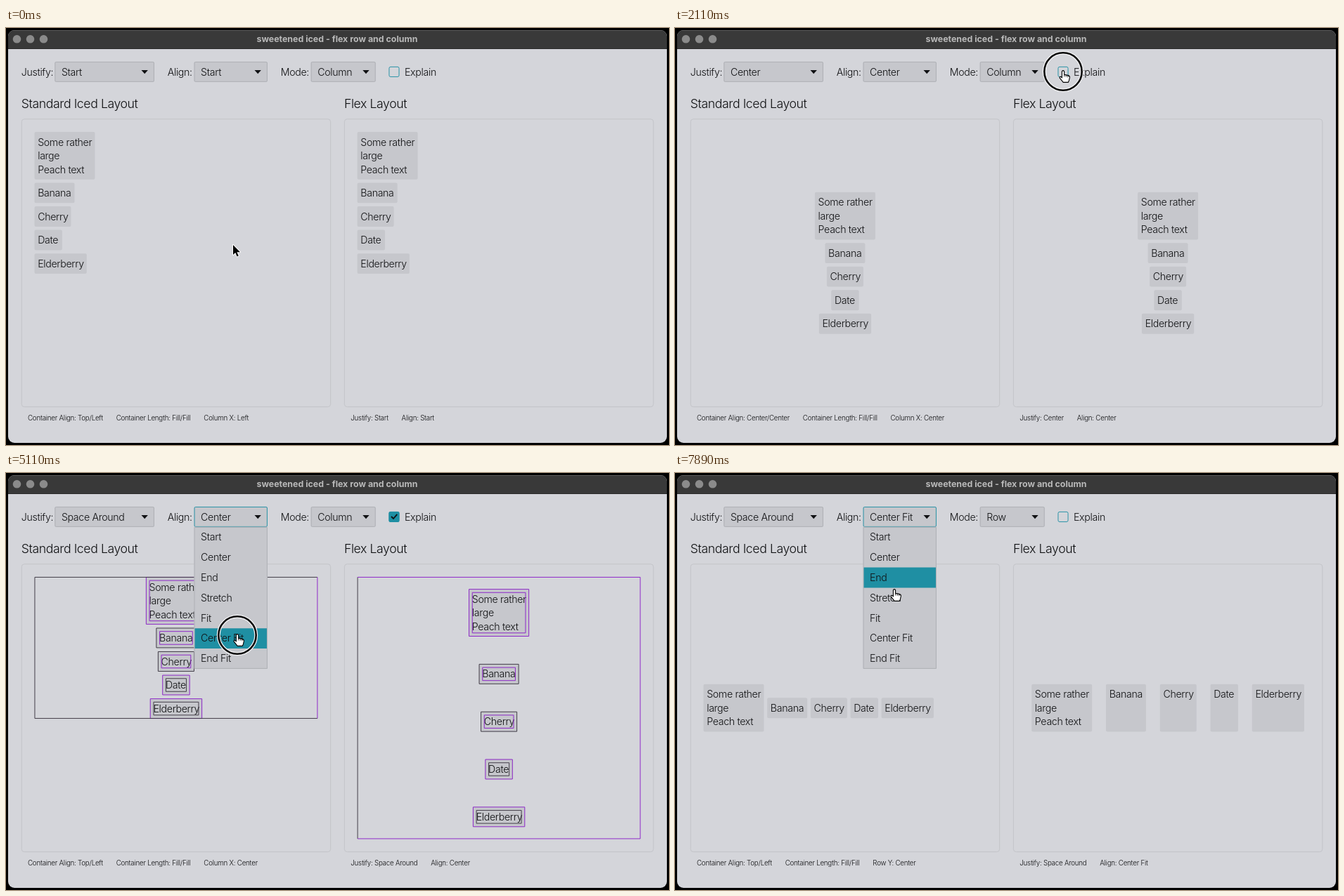
Write an HTML page with a canvas that moves like this. It is 943 px wide and 594 px high and loops after 8 s.

```html
<!DOCTYPE html>
<html lang="en">
<head>
<meta charset="utf-8">
<title>Flex row and column</title>
<style>
html, body { margin: 0; width: 100%; height: 100%; overflow: hidden; background: #000; }
canvas { display: block; }
</style>
</head>
<body>
<canvas id="stage" width="943" height="594"></canvas>
<script>
const ctx = document.getElementById('stage').getContext('2d');
const STEP = 1000 / 9, STEPS = 72;
const BG = '#d4d5da', FILL = '#c6c7cc', EDGE = '#adafb4', INK = '#101113';
const TEAL = '#1f8fa3', PURPLE = '#8a1fc8', DARK = '#3a3540';

// The interface is laid out in logical units and shown at this scale
const UNIT = 0.937;
const PAD = 5 * UNIT, GAP = 5 * UNIT, MARGIN = 20 * UNIT;
const TEXT_LINE = 20.8 * UNIT, ROW = TEXT_LINE + 2 * PAD;
const PICK_TOP = 48, MENU_TOP = PICK_TOP + ROW;
const PANEL = { left: 21.74, right: 480.9, y: 129.25, w: 470 * UNIT, h: 410.9 };
const INNER = { y: PANEL.y + MARGIN, w: PANEL.w - 2 * MARGIN, h: PANEL.h - 2 * MARGIN };

const picks = {
  justify: { label: 'Justify:', lx: 21.8, x: 69.4, w: 141.5,
    options: ['Start', 'Center', 'End', 'Space Between', 'Space Around', 'Space Evenly'] },
  align: { label: 'Align:', lx: 229.7, x: 267.6, w: 104.3,
    options: ['Start', 'Center', 'End', 'Stretch', 'Fit', 'Center Fit', 'End Fit'] },
  mode: { label: 'Mode:', lx: 390.7, x: 433.7, w: 92, options: ['Row', 'Column'] }
};

const TALL = 3 * TEXT_LINE + 2 * PAD, WIDE = 86;
const items = [
  { lines: ['Some rather', 'large', 'Peach text'], w: WIDE, h: TALL, outer: PURPLE, inner: PURPLE },
  { lines: ['Banana'], w: 57, h: ROW, outer: DARK, inner: PURPLE },
  { lines: ['Cherry'], w: 52, h: ROW, outer: DARK, inner: PURPLE },
  { lines: ['Date'], w: 39.4, h: ROW, outer: PURPLE, inner: DARK },
  { lines: ['Elderberry'], w: 74.3, h: ROW, outer: PURPLE, inner: DARK }
];

// [step, x, y] of the pointer tip
const pointerPath = [
  [0, 323, 309], [1, 318, 300], [3, 150, 66], [4, 150, 66], [6, 112, 115], [8, 112, 118],
  [9, 300, 66], [10, 300, 66], [11, 305, 110], [12, 307, 134], [13, 309, 124], [15, 309, 122],
  [18, 552, 62], [20, 552, 62], [24, 165, 66], [25, 166, 100], [26, 167, 167], [27, 167, 184],
  [30, 167, 184], [32, 178, 66], [33, 178, 100], [34, 174, 195], [35, 173, 203], [37, 173, 203],
  [42, 310, 66], [43, 312, 80], [45, 327, 226], [46, 329, 231], [48, 329, 231], [52, 552, 62],
  [54, 552, 62], [57, 480, 66], [58, 480, 90], [59, 482, 107], [60, 483, 113], [62, 478, 92],
  [64, 478, 92], [67, 318, 66], [68, 318, 66], [69, 316, 95], [70, 313, 150], [71, 312, 167]
];
const clicks = [3, 7, 9, 14, 19, 24, 29, 32, 42, 46, 53, 57, 63, 68];

// [step, changed state]
const changes = [
  [0, { justify: 'Start', align: 'Start', mode: 'Column', explain: false, open: '' }],
  [4, { open: 'justify' }], [8, { open: '', justify: 'Center' }],
  [10, { open: 'align' }], [15, { open: '', align: 'Center' }],
  [20, { explain: true }],
  [25, { open: 'justify' }], [30, { open: '', justify: 'Space Between' }],
  [33, { open: 'justify' }], [36, { open: '', justify: 'Space Around' }],
  [43, { open: 'align' }], [47, { open: '', align: 'Center Fit' }],
  [54, { explain: false }],
  [58, { open: 'mode' }], [64, { open: '', mode: 'Row' }],
  [69, { open: 'align' }]
];

const stateAt = n => Object.assign({}, ...changes.filter(c => c[0] <= n).map(c => c[1]));

function pointerAt(n) {
  const i = pointerPath.findIndex(p => p[0] >= n);
  const b = pointerPath[i], a = pointerPath[Math.max(0, i - 1)];
  let k = b === a ? 0 : (n - a[0]) / (b[0] - a[0]);
  k = k * k * (3 - 2 * k);
  return { x: a[1] + (b[1] - a[1]) * k, y: a[2] + (b[2] - a[2]) * k };
}

function text(s, x, cy, size = 14.2, { weight = 300, color = INK, tracking = -0.024, center = false } = {}) {
  ctx.font = `${weight} ${size}px Inter, "Open Sans", sans-serif`;
  ctx.letterSpacing = `${(size * tracking).toFixed(3)}px`;
  ctx.textAlign = center ? 'center' : 'left';
  ctx.fillStyle = color;
  ctx.fillText(s, x, cy + size * 0.36);
  return ctx.measureText(s).width;
}

function box(x, y, w, h, fill, stroke, r = 0) {
  if (fill) {
    ctx.beginPath();
    ctx.roundRect(x, y, w, h, r);
    ctx.fillStyle = fill;
    ctx.fill();
  }
  if (stroke) {
    ctx.beginPath();
    ctx.roundRect(x + UNIT / 2, y + UNIT / 2, w - UNIT, h - UNIT, r);
    ctx.strokeStyle = stroke;
    ctx.lineWidth = UNIT;
    ctx.stroke();
  }
}

function polyline(points, color, width = UNIT) {
  ctx.beginPath();
  points.forEach(p => ctx.lineTo(...p));
  ctx.strokeStyle = color;
  ctx.lineWidth = width;
  ctx.stroke();
}

function drawWindow() {
  ctx.fillStyle = '#000';
  ctx.fillRect(0, 0, 943, 594);
  box(3, 3, 937, 588, BG, null, 9);
  box(3, 3, 937, 27, '#393939', null, [9, 9, 0, 0]);
  ctx.fillStyle = '#5c5c5c';
  ctx.fillRect(11, 3, 921, 1);
  ctx.fillStyle = '#2a2a2a';
  ctx.fillRect(3, 29, 937, 1);
  for (const x of [15.5, 34.5, 53.5]) {
    ctx.beginPath();
    ctx.arc(x, 15.8, 5.8, 0, 7);
    ctx.fillStyle = '#8b8b8b';
    ctx.fill();
  }
  text('sweetened iced - flex row and column', 471, 15.5, 12.4,
    { weight: 700, color: '#b9b9b9', tracking: 0, center: true });
}

const inPick = (pick, p) =>
  p.x > pick.x && p.x < pick.x + pick.w && p.y > PICK_TOP && p.y < MENU_TOP;

function drawControls(state, pointer) {
  const cy = PICK_TOP + ROW / 2;
  for (const [key, pick] of Object.entries(picks)) {
    text(pick.label, pick.lx, cy);
    const active = state.open === key || (!state.open && inPick(pick, pointer));
    box(pick.x, PICK_TOP, pick.w, ROW, FILL, active ? TEAL : EDGE, 1.5);
    text(state[key], pick.x + 9.5, cy);
    const ax = pick.x + pick.w - 13.7;
    ctx.beginPath();
    ctx.moveTo(ax - 4.7, 60);
    ctx.lineTo(ax + 4.7, 60);
    ctx.lineTo(ax, 65.2);
    ctx.fillStyle = INK;
    ctx.fill();
  }
  box(544.5, cy - 7.5, 15, 15, state.explain ? TEAL : null, TEAL, 2);
  if (state.explain) polyline([[548, 62], [551, 65], [556.3, 58.8]], INK, 1.8);
  text('Explain', 567, cy);
}

// Positions of all items along the main axis
function mainAxis(justify, sizes, length) {
  const used = sizes.reduce((a, b) => a + b) + GAP * (sizes.length - 1);
  const free = length - used;
  const [start, extra] = {
    Center: [free / 2, 0],
    'Space Between': [0, free / 4],
    'Space Around': [free / 10, free / 5]
  }[justify] || [0, 0];
  let at = start;
  return sizes.map(s => {
    const here = at;
    at += s + GAP + extra;
    return here;
  });
}

function drawItems(ox, state, flex) {
  const { y: oy, w: W, h: H } = INNER;
  const row = state.mode === 'Row', fit = flex && state.align === 'Center Fit';
  const justify = flex || (state.justify === 'Center' && !row) ? state.justify : 'Start';
  const starts = mainAxis(justify, items.map(i => row ? i.w : i.h), row ? W : H);
  const cross = size => state.align === 'Start' ? 0 : ((row ? H : W) - size) / 2;
  const placed = items.map((item, i) => {
    const w = fit && !row ? WIDE : item.w, h = fit && row ? TALL : item.h;
    return row ? { item, w, h, x: ox + starts[i], y: oy + cross(h) }
               : { item, w, h, x: ox + cross(w), y: oy + starts[i] };
  });
  for (const { item, x, y, w, h } of placed) {
    box(x, y, w, h, FILL, null, 2);
    item.lines.forEach((s, i) => text(s, x + PAD, y + PAD + TEXT_LINE * (i + 0.5)));
    if (state.explain) {
      box(x, y, w, h, null, item.outer);
      box(x + PAD, y + PAD, item.w - 2 * PAD, h - 2 * PAD, null, item.inner);
    }
  }
  if (state.explain) {
    const last = placed[4], half = UNIT / 2;
    const spaced = justify.startsWith('Space');
    const l = ox + half, r = ox + W - half;
    const t = (spaced ? oy : placed[0].y) + half;
    const b = (spaced ? oy + H : last.y + last.h) - half;
    polyline([[l, b], [l, t]], DARK);
    polyline([[l, t], [r, t]], spaced ? PURPLE : DARK);
    polyline([[l, b], [r, b]], justify === 'Start' ? DARK : PURPLE);
    polyline([[r, t], [r, b]], PURPLE);
  }
}

function footer(x, parts) {
  for (const s of parts) x += text(s, x, 555.8, 9.75) + MARGIN;
}

function drawPanels(state) {
  text('Standard Iced Layout', PANEL.left, 107.8, 17.7);
  text('Flex Layout', PANEL.right, 107.8, 17.7);
  for (const x of [PANEL.left, PANEL.right]) {
    box(x, PANEL.y, PANEL.w, PANEL.h, null, '#c2c3c8', 4);
    drawItems(x + MARGIN, state, x === PANEL.right);
  }
  const row = state.mode === 'Row', start = state.align === 'Start';
  footer(31, [
    `Container Align: ${state.justify === 'Center' ? 'Center/Center' : 'Top/Left'}`,
    'Container Length: Fill/Fill',
    `${row ? 'Row Y' : 'Column X'}: ${start ? (row ? 'Top' : 'Left') : 'Center'}`
  ]);
  footer(490.3, [`Justify: ${state.justify}`, `Align: ${state.align}`]);
}

function drawMenu(pick, hoverY) {
  const { x, w, options } = pick;
  box(x, MENU_TOP, w, ROW * options.length, FILL, EDGE);
  const hovered = Math.floor((hoverY - MENU_TOP) / ROW);
  options.forEach((s, i) => {
    const y = MENU_TOP + ROW * i;
    if (i === hovered) box(x + UNIT, y, w - 2 * UNIT, ROW, TEAL);
    text(s, x + 9.5, y + ROW / 2 - 0.3);
  });
}

const arrow = new Path2D('M0 0V14l3.2-3 2.4 5.4 2.2-1-2.4-5.2h4.6z');
const hand = new Path2D('M-1.6 -.2Q0-2.6 1.6-.2V4.4l5 1q3 .8 2.8 3l-1 4.5-1.2 2.5h-7l-5-6.3q-.5-2 1.5-1.7l1.7 1.5z');
const knuckles = new Path2D('M1.6 4.4v3M4.2 5.1v2.8M6.7 5.7v2.6');

function drawPointer({ x, y }, isHand, pressed) {
  ctx.save();
  ctx.translate(x, y);
  ctx.lineJoin = 'round';
  if (pressed) {
    for (const [color, width] of [['#f4f4f6', 5], ['#0a0a0a', 2.6]]) {
      ctx.beginPath();
      ctx.arc(0, 0, 26.7, 0, 7);
      ctx.strokeStyle = color;
      ctx.lineWidth = width;
      ctx.stroke();
    }
  }
  ctx.fillStyle = isHand ? '#fff' : '#000';
  ctx.strokeStyle = isHand ? '#000' : '#fff';
  ctx.lineWidth = isHand ? 1.1 : 2;
  if (isHand) {
    ctx.fill(hand);
    ctx.stroke(hand);
    ctx.lineWidth = 0.8;
    ctx.stroke(knuckles);
  } else {
    ctx.stroke(arrow);
    ctx.fill(arrow);
  }
  ctx.restore();
}

function draw(n) {
  const state = stateAt(n), pointer = pointerAt(n), menu = picks[state.open];
  drawWindow();
  drawControls(state, pointer);
  drawPanels(state);
  // The highlight trails the pointer by one step
  if (menu) drawMenu(menu, pointerAt(Math.max(0, n - 1)).y);
  const overCheck = pointer.x > 544 && pointer.x < 612 && pointer.y > 54 && pointer.y < 70;
  const isHand = !!menu || overCheck || Object.values(picks).some(p => inPick(p, pointer));
  drawPointer(pointer, isHand, clicks.includes(n));
}

const origin = performance.now();
function tick() {
  const t = (performance.now() - origin) % 8000;
  draw(Math.floor((t + 4) / STEP) % STEPS);
  requestAnimationFrame(tick);
}
tick();
</script>
</body>
</html>
```
